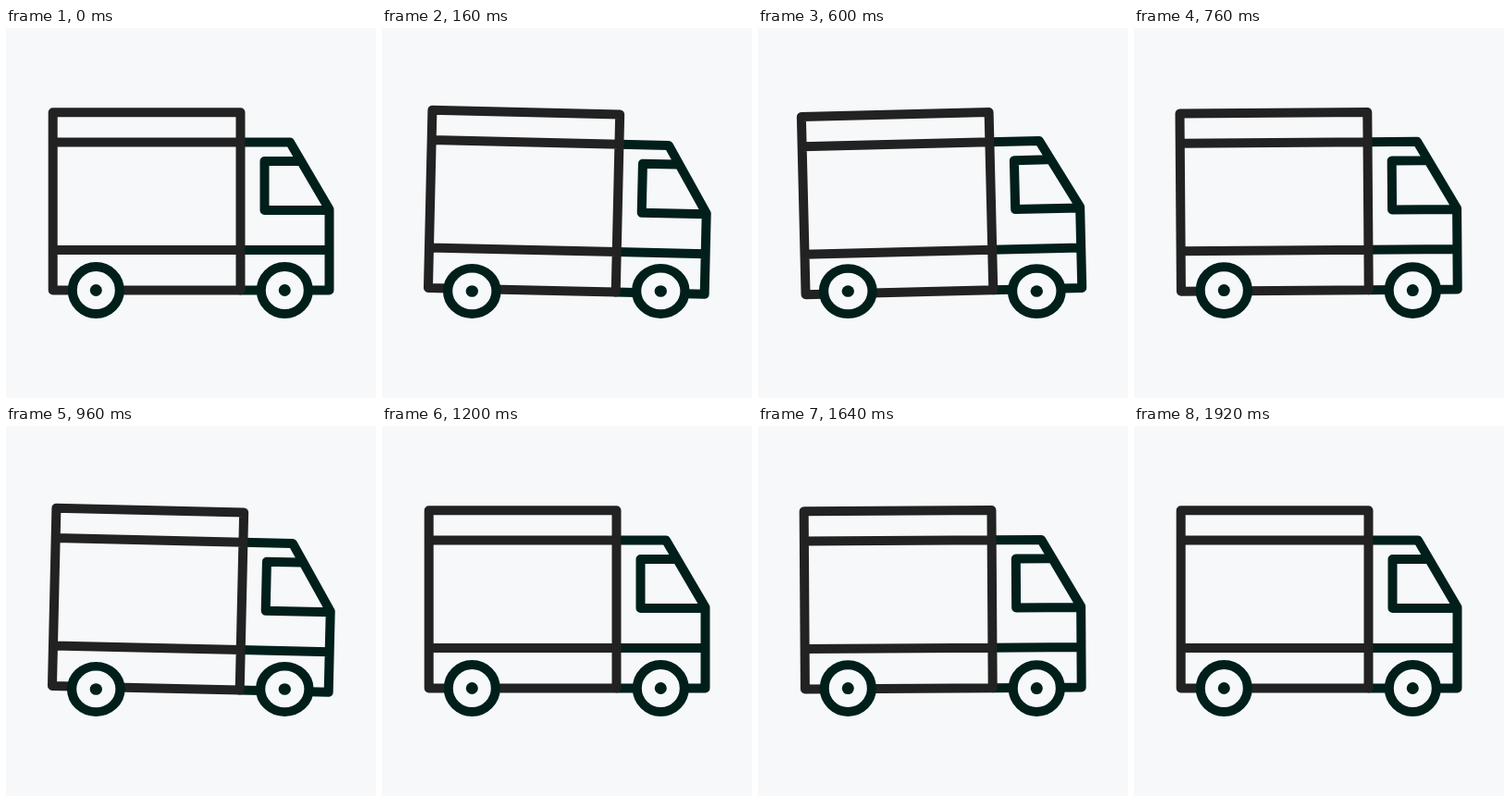
Animation of 400 by 400 pixels, one loop 2000 ms. Source, as an HTML page:

```html
<!DOCTYPE html>
<html lang="en">
<head>
<meta charset="utf-8">
<title>Delivery truck</title>
<style>
  html, body { margin: 0; width: 100%; height: 100%; overflow: hidden; background: #f6f8fa; }
  svg { display: block; width: 100vw; height: 100vh; }
  .line { fill: none; stroke-width: 10; stroke-linecap: round; stroke-linejoin: round; }
  .cab { stroke: #001f1b; }
  .box { stroke: #222; }
</style>
</head>
<body>
<svg viewBox="0 0 400 400">
  <defs>
    <g id="wheel">
      <circle class="cab" r="25.5" fill="#f6f8fa" stroke-width="10"/>
      <circle r="6.5" fill="#001f1b"/>
    </g>
  </defs>
  <g id="body" class="line">
    <path class="cab" d="M253.5 123.5H307L349.5 196V283.5H253.5M253.5 240H349.5M316 144H279.5V197H349.5"/>
    <path class="box" d="M50.7 91.3H253.5V283.5H50.7ZM50.7 123.5H253.5M50.7 240H253.5"/>
  </g>
  <use class="wheel" href="#wheel"/>
  <use class="wheel" href="#wheel"/>
</svg>
<script>
const LOOP = 2000, STEP = 40, SWING = 800, SETTLE = 1400, REST = 1920;
const TILT = 1.4, GROUND = 314, RADIUS = 30.5;
const body = document.getElementById('body');
const wheels = document.querySelectorAll('.wheel');
const wheelX = [97.3, 301.3];

// Two-way rocking, then an eased return to level; ranges from -1 to 1.
function sway(t) {
  if (t < SETTLE) return Math.sin(2 * Math.PI * t / SWING);
  const u = Math.min(1, (t - SETTLE) / (REST - SETTLE));
  return -(1 + Math.cos(Math.PI * u ** 0.55)) / 2;
}

function draw(now) {
  const t = Math.floor(now % LOOP / STEP) * STEP;
  const a = sway(t), press = a * a;
  body.setAttribute('transform', `translate(0 ${press}) rotate(${TILT * a} 202 250)`);

  // Tyres flatten against the ground as the load leans.
  const sx = 1 + 0.03 * press, sy = 1 - 0.035 * press;
  wheels.forEach((wheel, i) => wheel.setAttribute('transform',
    `translate(${wheelX[i]} ${GROUND - RADIUS * sy}) scale(${sx} ${sy})`));
}

const start = performance.now();
function tick() {
  draw(performance.now() - start);
  requestAnimationFrame(tick);
}
tick();
</script>
</body>
</html>
```
